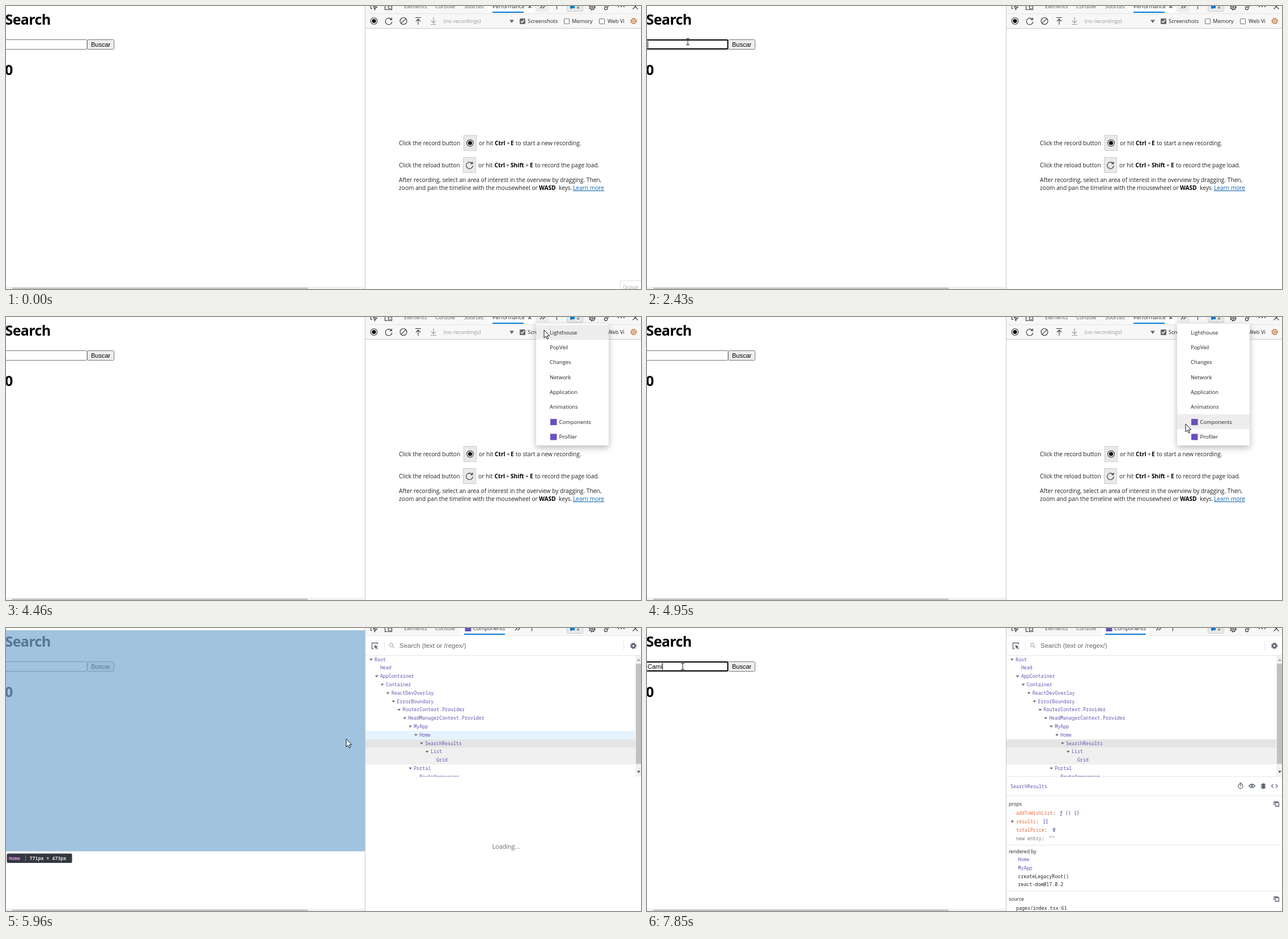
Animation, 1120 px wide and 500 px high, one loop 8000 ms. Source, as an HTML page:

```html
<!DOCTYPE html>
<html lang="en">
<head>
<meta charset="utf-8">
<title>Search page with developer tools</title>
<style>
html, body { margin: 0; width: 100%; height: 100%; overflow: hidden; background: #fff; }
svg { display: block; }
text { font: 9.4px "Open Sans", sans-serif; fill: #222; white-space: pre; }
.head { font-size: 25px; font-weight: 700; letter-spacing: -.6px; fill: #000; }
.form { font: 11px "Liberation Sans", Arial, sans-serif; fill: #000; }
.find { font: 11.5px "Liberation Sans", Arial, sans-serif; fill: #666; }
.hint text { font-size: 10.2px; }
.b { font-weight: 700; fill: #000; }
.tab { fill: #5a5a5a; }
.small { font-size: 8.6px; }
.mono { font: 8.3px "Noto Sans Mono", monospace; }
.name { fill: #6a51b2; }
.key { fill: #ec6a35; }
.val { fill: #3d3d9e; }
.dim { fill: #777; }
.ico { fill: none; stroke: #333; stroke-width: 1.1; }
.grey { fill: none; stroke: #5f6673; stroke-width: 1.3; }
.line { stroke: #e6e6e6; }

/* percent = ms / 80 */
.anim { animation: 8s step-end -10ms infinite; }
#tip { animation-name: tip; }
@keyframes tip { 0% { opacity: 1 } .875%, 100% { opacity: 0 } }
#ring { animation-name: ring; }
@keyframes ring { 0%, 47.375% { opacity: 0 } 17.125%, 82.125%, 100% { opacity: 1 } }
#caret { animation-name: blink, caret; }
@keyframes blink {
  0%, 23.75%, 37%, 47.375%, 88.75% { opacity: 0 }
  17.125%, 30.375%, 43.625%, 82.125%, 92.875%, 100% { opacity: 1 }
}
@keyframes caret {
  0% { transform: none }
  92.875% { transform: translateX(8px) }
  94.75% { transform: translateX(14px) }
  95.625% { transform: translateX(23.5px) }
  98.125%, 100% { transform: translateX(26px) }
}
#k0 { animation-name: k0; }
#k1 { animation-name: k1; }
#k2 { animation-name: k2; }
#k3 { animation-name: k3; }
@keyframes k0 { 0% { opacity: 0 } 92.875%, 100% { opacity: 1 } }
@keyframes k1 { 0% { opacity: 0 } 94.75%, 100% { opacity: 1 } }
@keyframes k2 { 0% { opacity: 0 } 95.625%, 100% { opacity: 1 } }
@keyframes k3 { 0% { opacity: 0 } 98.125%, 100% { opacity: 1 } }
#perf { animation-name: perf; }
@keyframes perf { 0% { opacity: 1 } 70.125%, 100% { opacity: 0 } }
#comp { animation-name: comp; }
@keyframes comp { 0% { opacity: 0 } 70.125%, 100% { opacity: 1 } }
#tree { animation-name: tree; }
@keyframes tree { 0% { opacity: 0 } 74.5%, 100% { opacity: 1 } }
#frame { animation-name: frame; }
@keyframes frame { 0%, 75.375%, 100% { opacity: 1 } 74.5% { opacity: 0 } }
.hover { animation-name: hover; }
@keyframes hover { 0%, 75.375%, 100% { opacity: 0 } 74.5% { opacity: 1 } }
#info { animation-name: info; }
@keyframes info { 0% { opacity: 0 } 75.375%, 100% { opacity: 1 } }
#menu { animation-name: menu; }
@keyframes menu { 0%, 70.125%, 100% { opacity: 0 } 48.25% { opacity: 1 } }
#menu .box { filter: drop-shadow(0 4px 6px rgba(0, 0, 0, .28)); }
#pick { animation-name: pick; }
@keyframes pick {
  0% { opacity: 0 }
  55.75% { opacity: 1; transform: none }
  56.625% { opacity: 1; transform: translateY(52.6px) }
  57.5% { opacity: 1; transform: translateY(79px) }
  58.375% { opacity: 1; transform: translateY(105.3px) }
  59.25% { opacity: 1; transform: translateY(131.6px) }
  61%, 100% { opacity: 1; transform: translateY(158px) }
}
#arrow { animation-name: arrow; }
@keyframes arrow { 0%, 13.75%, 78.875%, 100% { opacity: 0 } 5.875%, 38.75% { opacity: 1 } }
#beam { animation-name: beam; }
@keyframes beam { 0%, 38.75% { opacity: 0 } 13.75%, 78.875%, 100% { opacity: 1 } }
#mouse { animation-name: mouse; }
@keyframes mouse {
  0% { transform: translate(1130px, 510px) }
  5.875% { transform: translate(939px, 409px); animation-timing-function: steps(3) }
  8.5% { transform: translate(560px, 230px); animation-timing-function: steps(3) }
  11.125% { transform: translate(270px, 110px); animation-timing-function: steps(3) }
  13.75% { transform: translate(110px, 70px); animation-timing-function: steps(2) }
  15.375% { transform: translate(72px, 63px) }
  37% { transform: translate(76px, 64px); animation-timing-function: steps(3) }
  39.625% { transform: translate(220px, 74px); animation-timing-function: steps(3) }
  42.25% { transform: translate(580px, 60px); animation-timing-function: steps(3) }
  44.875% { transform: translate(890px, 18px); animation-timing-function: steps(2) }
  46.5% { transform: translate(947px, 3px); animation-timing-function: steps(8) }
  54% { transform: translate(949px, 8px); animation-timing-function: steps(2) }
  55.75% { transform: translate(949px, 23px) }
  56.625% { transform: translate(949px, 70px) }
  57.5% { transform: translate(950px, 103px) }
  58.375% { transform: translate(951px, 130px) }
  59.25% { transform: translate(951px, 152px) }
  60.125% { transform: translate(950px, 168px) }
  61% { transform: translate(950px, 180px) }
  61.875% { transform: translate(950px, 189px) }
  70.125% { transform: translate(950px, 189px); animation-timing-function: steps(3) }
  72.75% { transform: translate(944px, 191px) }
  73.625% { transform: translate(895px, 193px) }
  74.5% { transform: translate(600px, 196px) }
  75.375% { transform: translate(371px, 171px) }
  76.25% { transform: translate(235px, 140px) }
  77.125% { transform: translate(155px, 108px) }
  78% { transform: translate(108px, 86px); animation-timing-function: steps(2) }
  79.75% { transform: translate(66px, 69px) }
  80.625%, 100% { transform: translate(63px, 68px) }
}
</style>
</head>
<body>
<svg width="1120" height="500" viewBox="0 0 1120 500">
  <defs>
    <clipPath id="list"><rect x="634" y="49" width="486" height="213.5"/></clipPath>
    <path id="reload" d="M4.6-3.4A5.8 5.8 0 1 0 5.8 .6M5.4-6.5V-2.9H1.8"/>
    <g id="rec"><circle r="5.8"/><circle r="3.6" fill="#111" stroke="none"/></g>
    <g id="cog">
      <circle r="4.7" stroke-width="2" stroke-dasharray="1.85 1.84"/>
      <circle r="3.8"/><circle r="1.5"/>
    </g>
    <g id="copy"><path d="M-4 2V-4H3M-1.5-2.5H4.5V4H-1.5z"/></g>
  </defs>

  <!-- page -->
  <text class="head" x="-1.5" y="33">Search</text>
  <text class="head" x="-2" y="122">0</text>
  <rect x="-9.5" y="59.5" width="152.5" height="17" rx="1.5" fill="#fff" stroke="#767676"/>
  <rect id="ring" class="anim" x="-9" y="60" width="151.5" height="15.8" rx="2" fill="#fff" stroke="#000" stroke-width="2"/>
  <text class="form" x="1" y="72"><tspan id="k0" class="anim"></tspan></text>
  <g id="typed"></g>
  <rect id="caret" class="anim" x="1" y="62" width="1" height="12"/>
  <rect x="143.5" y="59.5" width="47" height="17" rx="2" fill="#efefef" stroke="#767676"/>
  <text class="form" x="150" y="72">Buscar</text>
  <g class="anim hover">
    <rect y="4" width="633" height="390.5" fill="rgba(120,170,210,.7)"/>
    <rect x="1.5" y="398.5" width="115" height="16.5" rx="2" fill="#333740"/>
    <path d="M34.5 402V412" stroke="#888"/>
    <text class="mono" x="5" y="410" style="fill:#dd91dc;font-weight:600">Home</text>
    <text class="mono" x="41.5" y="410" style="fill:#e2e2e2;font-weight:600">771px × 473px</text>
  </g>
  <rect y="496" width="633" height="4" fill="#f1f1f1"/>
  <rect x="11" y="497.5" width="521" height="3" fill="#c1c1c1"/>

  <!-- developer tools -->
  <rect x="633" width="487" height="500" fill="#fff"/>
  <rect x="634" width="486" height="13" fill="#f7f7f7"/>
  <g id="perf" class="anim">
    <rect x="850" width="81" height="13" fill="#fff"/>
    <rect x="935" width="22" height="10" fill="#ececec"/>
    <rect x="634" y="13" width="486" height="26" fill="#f7f7f7"/>
    <path d="M634 13.5H1120" stroke="#e4e4e4"/><path d="M634 39.5H1120" stroke="#ccc"/>
    <text class="tab" x="808" y="4">Sources</text>
    <text x="858" y="4">Performance</text>
    <rect x="858" y="10" width="55" height="2" fill="#0078d4"/>
    <g class="ico">
      <path d="M921.5-1.5L926.5 3.5M926.5-1.5L921.5 3.5" stroke-width="1.4"/>
      <path d="M942-3L945.5 .5L942 4M946.5-3L950 .5L946.5 4M971.5 0V5.5"/>
      <use href="#rec" x="649" y="26.5"/><use href="#reload" x="675" y="27"/>
      <circle cx="701" cy="26.5" r="6"/><path d="M705.2 22.3L696.8 30.7"/>
      <path d="M722 20.5H732M727 33V23M723 27L727 23L731 27"/>
      <path d="M749 32.5H759M754 20V29.5M750 26L754 30L758 26" stroke="#999"/>
      <rect x="984.5" y="22.5" width="9" height="9" rx="1.5" fill="#fff" stroke="#767676"/>
      <rect x="1046.5" y="22.5" width="9" height="9" rx="1.5" fill="#fff" stroke="#767676"/>
      <use href="#cog" x="1107" y="26.5" stroke="#c8692c"/>
    </g>
    <rect x="906" y="22" width="10" height="10" rx="1.5" fill="#666"/>
    <path d="M908 27L910.2 29.3L914 24.5" fill="none" stroke="#fff" stroke-width="1.4"/>
    <path d="M888 24.5H896L892 30z" fill="#666"/>
    <text x="772" y="30" style="fill:#999">(no recordings)</text>
    <text x="920" y="30">Screenshots</text>
    <text x="998" y="30">Memory</text>
    <text x="1061" y="30">Web Vi</text>
    <g class="hint">
      <rect x="807.5" y="228.5" width="22" height="27" fill="#e9e9e9" stroke="#ccc"/>
      <rect x="806.5" y="267.5" width="22" height="27" fill="#e9e9e9" stroke="#ccc"/>
      <use class="ico" href="#rec" x="818.5" y="242"/><use class="ico" href="#reload" x="817.5" y="281.5"/>
      <text x="693" y="246">Click the record button</text>
      <text x="834" y="246">or hit <tspan x="862" class="b">Ctrl</tspan><tspan x="883">+</tspan><tspan x="890" class="b">E</tspan><tspan x="899">to start a new recording.</tspan></text>
      <text x="693" y="285">Click the reload button</text>
      <text x="833" y="285">or hit <tspan x="861.5" class="b">Ctrl</tspan><tspan x="882">+</tspan><tspan x="890" class="b">Shift</tspan><tspan x="916">+</tspan><tspan x="924" class="b">E</tspan><tspan x="933">to record the page load.</tspan></text>
      <text x="693" y="311">After recording, select an area of interest in the overview by dragging. Then,</text>
      <text x="693" y="325">zoom and pan the timeline with the mousewheel or <tspan x="940" class="b">WASD</tspan><tspan x="975">keys.</tspan></text>
      <text x="1000" y="325" style="fill:#0b63ac;text-decoration:underline">Learn more</text>
    </g>
  </g>

  <g id="comp" class="anim">
    <rect x="634" y="13" width="486" height="487" fill="#fff"/>
    <rect x="801" width="84" height="13" fill="#fff"/>
    <path class="line" d="M634 13.5H1120M634 48.5H1120M667.5 23V40M1089.5 23V40"/>
    <rect x="809.5" y="-4" width="11" height="10" fill="#6a50bd"/>
    <text x="824" y="4">Components</text>
    <rect x="808" y="10" width="72" height="2" fill="#0078d4"/>
    <path class="ico" d="M898-3L901.5 .5L898 4M902.5-3L906 .5L902.5 4M927.5 0V5.5"/>
    <g class="grey">
      <path d="M648 36.5H645.5V26.5H655.5V29"/>
      <path d="M649.5 30L656.5 33L653.5 34L656 37L655 38L652.5 35L651 37z" fill="#5f6673" stroke="none"/>
      <g stroke="#bbb"><circle cx="679.5" cy="30" r="3"/><path d="M681.8 32.3L685 35.5"/></g>
      <circle cx="1106.5" cy="31.5" r="3.1" stroke-width="2.6"/>
      <circle cx="1106.5" cy="31.5" r="4.9" stroke-width="1.6" stroke-dasharray="2.2 1.65"/>
    </g>
    <text class="find" x="694" y="35">Search (text or /regex/)</text>
    <path id="frame" class="anim line" d="M634 262.5H1120M634 296.5H1120"/>
    <g id="tree" class="anim">
      <g id="rows" clip-path="url(#list)">
        <rect class="anim hover" x="634" y="182" width="476" height="14.8" fill="#e5f3ff"/>
        <rect x="634" y="196.8" width="476" height="14.8" fill="#e4e4e4"/>
        <rect x="634" y="211.6" width="476" height="29.6" fill="#f0f0f0"/>
        <rect x="1110" y="49" width="10" height="213.5" fill="#f1f1f1"/>
        <rect x="1111" y="63" width="9" height="177" fill="#c1c1c1"/>
        <path d="M1113 58L1116 54.5L1119 58z" fill="#999"/><path d="M1113 252.5H1119L1116 256z" fill="#444"/>
      </g>
    </g>
    <text class="anim hover" x="857.5" y="390" style="font-size:10.8px;fill:#666">Loading...</text>
    <g id="info" class="anim">
      <path class="line" d="M634 383.5H1120M634 464.5H1120"/>
      <g class="grey">
        <circle cx="1047" cy="279.5" r="4"/><path d="M1045 273.8H1049M1047 277V280"/>
        <path d="M1061.5 279Q1067 272.5 1072.5 279Q1067 285.5 1061.5 279z"/><circle cx="1067" cy="279" r="1.5"/>
        <rect x="1084.8" y="275.5" width="4.6" height="8" rx="2.3" fill="#5f6673"/>
        <path d="M1082.5 276.5H1091.5M1082.5 279.5H1091.5M1082.5 282.5H1091.5M1085 274L1086 275M1089 274L1088 275" stroke-width="1"/>
        <path d="M1104.5 276L1101.5 279L1104.5 282M1109 276L1112 279L1109 282"/>
        <use href="#copy" x="1110" y="311"/><use href="#copy" x="1110" y="479"/>
      </g>
      <path d="M643 339L646.5 341.8L643 344.6z" fill="#555"/>
      <text class="small" x="638" y="314">props</text>
      <text class="small" x="638" y="398">rendered by</text>
      <text class="small" x="638" y="482">source</text>
    </g>
  </g>

  <!-- shared tab strip -->
  <text class="tab" x="702" y="4">Elements</text>
  <text class="tab" x="757" y="4">Console</text>
  <g class="ico">
    <path d="M646 4.5H643.5V-3M654.5-3V1M648 0L654 2.5L651.5 3.5L650.5 6.5z"/>
    <path d="M668.5-3V6.5H673M674.5 6.5V0H680.5V6.5zM676 4.5H679"/>
    <use href="#cog" x="1034" y="2"/>
    <circle cx="1058" cy="4" r="2.6"/><path d="M1056-1H1062M1060.5 2L1063 0"/>
  </g>
  <rect x="989.5" y="-3.5" width="28" height="13" rx="2" fill="#e8e8e8" stroke="#ccc"/>
  <path d="M995-3H1003V4H998L996 6V4H995z" fill="#0078d4"/>
  <text x="1006.5" y="4">2</text>
  <path d="M1079 1H1081M1084 1H1086M1089 1H1091" stroke="#333" stroke-width="1.6"/>
  <path class="ico" d="M1105.5-3.5L1114.5 5.5M1114.5-3.5L1105.5 5.5"/>
  <path d="M633.5 0V500" stroke="#c6c6c6"/>

  <g id="tip" class="anim">
    <rect x="1083.5" y="485.5" width="50" height="20" fill="#fff" stroke="#ddd"/>
    <text x="1088" y="499.5" style="font-size:9px;fill:#aaa">Gravar</text>
  </g>

  <g id="menu" class="anim">
    <rect class="box" x="935" y="12" width="128" height="215" rx="2" fill="#fff"/>
    <rect id="pick" class="anim" x="935" y="14" width="128" height="26.3" fill="#ededed"/>
  </g>

  <g id="mouse" class="anim">
    <path id="arrow" class="anim" d="M0 0V14L3.2 11L5.4 16L7.6 15L5.4 10.2H9.7z" fill="#fff" stroke="#111" stroke-width="1"/>
    <path id="beam" class="anim" d="M-3-5.5H-1L0-5L1-5.5H3M0-5V5M-3 5.5H-1L0 5L1 5.5H3" fill="none" stroke="#111"/>
  </g>
</svg>
<script>
const NS = 'http://www.w3.org/2000/svg';
const $ = id => document.getElementById(id);

function add(parent, tag, attrs, content = '') {
  const el = document.createElementNS(NS, tag);
  for (const k in attrs) el.setAttribute(k, attrs[k]);
  el.textContent = content;
  parent.append(el);
}
const mono = (parent, x, y, cls, str) => add(parent, 'text', { x, y, class: 'mono ' + cls }, str);

// typed letters, each shown by its own key press
$('k0').parentNode.remove();
[['C', 1], ['a', 8.9], ['m', 15], ['i', 24.2]].forEach(([c, x], i) =>
  add($('typed'), 'text', { id: 'k' + i, class: 'anim form', x, y: 72 }, c));

// component tree: name, depth, leaf
[['Root', 0], ['Head', 1, 1], ['AppContainer', 1], ['Container', 2], ['ReactDevOverlay', 3],
 ['ErrorBoundary', 4], ['RouterContext.Provider', 5], ['HeadManagerContext.Provider', 6],
 ['MyApp', 7], ['Home', 8], ['SearchResults', 9], ['List', 10], ['Grid', 11, 1],
 ['Portal', 7], ['RouteAnnouncer', 8, 1]].forEach(([name, depth, leaf], i) => {
  const x = 650 + depth * 9.9, y = 55.7 + i * 14.8;
  mono($('rows'), x, y + 2.8, 'name', name);
  if (!leaf) add($('rows'), 'path', { d: `M${x - 9} ${y - 1.5}h5.6l-2.8 3.5z`, fill: '#666' });
});

const info = $('info');
mono(info, 641, 282.5, 'name', 'SearchResults');
[['addToWishList', 'ƒ () {}', 728], ['results', '[]', 698], ['totalPrice', '0', 715.5], ['new entry', '""', 709]]
  .forEach(([key, value, x], i) => {
    const y = 330.3 + i * 14.8;
    mono(info, 651, y, i < 3 ? 'key' : 'dim', key);
    mono(info, 651 + key.length * 4.98, y, '', ':');
    mono(info, x, y, 'val', value);
  });
['Home', 'MyApp', 'createLegacyRoot()', 'react-dom@17.0.2'].forEach((s, i) =>
  mono(info, 654.5, 412 + i * 14.8, i < 2 ? 'name' : '', s));
mono(info, 651, 498, '', 'pages/index.tsx:61');

['Lighthouse', 'PopVeil', 'Changes', 'Network', 'Application', 'Animations', 'Components', 'Profiler']
  .forEach((s, i) => {
    const y = 27 + i * 26.35, icon = i > 5;
    if (icon) add($('menu'), 'rect', { x: 960, y: y - 5, width: 11.5, height: 11, fill: '#6a50bd' });
    add($('menu'), 'text', { x: icon ? 975.5 : 959, y: y + 3.5 }, s);
  });
</script>
</body>
</html>
```
